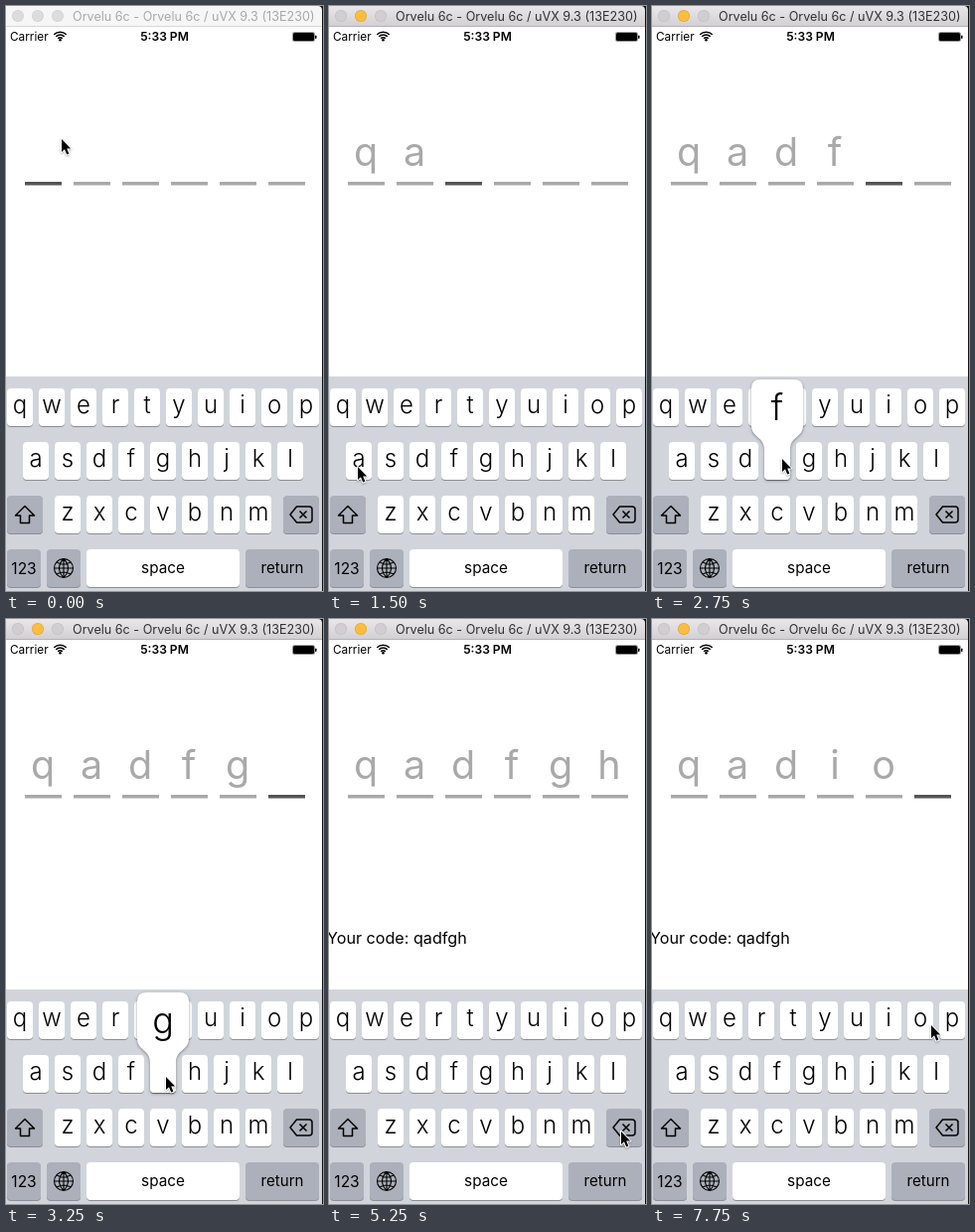
An HTML page with a canvas for the animation above (8 s loop, 319 px wide and 589 px high).

```html
<!DOCTYPE html>
<html lang="en">
<head>
<meta charset="utf-8">
<title>Code entry</title>
<style>
html, body { margin: 0; width: 100%; height: 100%; overflow: hidden; background: #fff; }
canvas { display: block; width: 319px; height: 589px; }
</style>
</head>
<body>
<canvas id="stage" width="319" height="589"></canvas>
<script>
const ctx = document.getElementById('stage').getContext('2d');
const LOOP = 8000;
const ROWS = [['qwertyuiop', 1, 385], ['asdfghjkl', 17, 439], ['zxcvbnm', 49, 493]];
const KEY_W = 26, KEY_H = 38, PITCH = 32;
const LIGHT = '#fff', DARK = '#abb0ba';

// start ms, pointer x, pointer y, typed code, pressed key
const STEPS = [
  [0, 56, 134, ''],
  [250, 46, 230, ''],
  [500, 25, 365, ''],
  [750, 17, 404, ''],
  [1000, 17, 405, 'q', 'q'],
  [1250, 21, 434, 'q'],
  [1500, 29, 464, 'qa'],
  [1750, 55, 465, 'qa'],
  [2000, 88, 463, 'qa'],
  [2250, 93, 462, 'qad', 'd'],
  [2500, 96, 461, 'qad'],
  [2750, 131, 456, 'qadf', 'f'],
  [3000, 146, 460, 'qadf'],
  [3250, 161, 461, 'qadfg', 'g'],
  [3500, 178, 459, 'qadfg'],
  [3750, 196, 455, 'qadfg'],
  [4000, 196, 455, 'qadfgh'],
  [4750, 228, 477, 'qadfgh'],
  [5000, 281, 510, 'qadfgh'],
  [5250, 294, 516, 'qadfgh'],
  [5500, 294, 516, 'qadfg'],
  [5750, 294, 516, 'qad', 'delete'],
  [6000, 274, 470, 'qad'],
  [6250, 248, 419, 'qad'],
  [6500, 242, 410, 'qad'],
  [6750, 242, 409, 'qadi', 'i'],
  [7000, 246, 409, 'qadi'],
  [7250, 270, 409, 'qadi'],
  [7500, 279, 409, 'qadio', 'o'],
  [7750, 281, 409, 'qadio']
];

function text(str, x, y, size, color = '#000', weight = 400, align = 'center') {
  ctx.font = `${weight} ${size}px Inter, sans-serif`;
  ctx.textAlign = align;
  ctx.fillStyle = color;
  ctx.fillText(str, x, y);
}

function rect(x, y, w, h, color) {
  ctx.fillStyle = color;
  ctx.fillRect(x, y, w, h);
}

function rounded(x, y, w, h, r, color) {
  ctx.beginPath();
  ctx.roundRect(x, y, w, h, r);
  ctx.fillStyle = color;
  ctx.fill();
}

function disc(x, y, r, color) {
  ctx.beginPath();
  ctx.arc(x, y, r, 0, Math.PI * 2);
  ctx.fillStyle = color;
  ctx.fill();
}

function strokePath(d, width = 1.5, color = '#000') {
  ctx.lineWidth = width;
  ctx.strokeStyle = color;
  ctx.lineJoin = 'round';
  ctx.stroke(new Path2D(d));
}

function key(x, y, w, color) {
  rounded(x, y + 1, w, KEY_H, 4, '#8b8e94');
  rounded(x, y, w, KEY_H, 4, color);
}

function titleBar(active) {
  rect(0, 0, 319, 21, '#000');
  const shade = ctx.createLinearGradient(0, 0, 0, 20);
  shade.addColorStop(0, active ? '#e9e7e9' : '#f6f6f6');
  shade.addColorStop(1, active ? '#d2d0d2' : '#f6f6f6');
  rounded(0, 0, 318, 20, [0, 4, 0, 0], shade);
  rect(0, 20, 318, 1, active ? '#b4b2b4' : '#d8d8d8');
  for (let i = 0; i < 3; i++) {
    const lit = active && i === 1;
    const rim = active ? '#bfbdbf' : '#d0d0d0';
    disc(12 + 20 * i, 10, 6, lit ? '#e0a030' : rim);
    disc(12 + 20 * i, 10, 5.4, lit ? '#fdbd3e' : active ? '#d0ced0' : '#dcdcdc');
  }
  text('Orvelu 6c - Orvelu 6c / uVX 9.3 (13E230)', 67, 15, 12.6,
    active ? '#303030' : '#a8a8a8', 400, 'left');
}

function statusBar() {
  text('Carrier', 4, 35, 11.8, '#000', 400, 'left');
  text('5:33 PM', 159.5, 35, 12.1, '#000', 600);
  for (const r of [3.2, 6, 8.8]) {
    ctx.beginPath();
    ctx.arc(54.5, 35, r, -Math.PI * 0.75, -Math.PI * 0.25);
    ctx.lineWidth = 1.6;
    ctx.strokeStyle = '#000';
    ctx.stroke();
  }
  disc(54.5, 34.3, 1.3, '#000');
  rounded(288, 26, 23, 10, 2.5, '#9a9a9a');
  rounded(289, 27, 21, 8, 1.5, '#000');
  rounded(311, 29.5, 1.5, 3.5, 1, '#000');
}

function codeField(code) {
  for (let i = 0; i < 6; i++) {
    rect(19 + 49 * i, 177, 37, 3.5, i === code.length ? '#555' : '#a9a9a9');
    if (code[i]) text(code[i], 37 + 49 * i, 161, 39.5, '#a9a9a9');
  }
}

function popup(letter, x, y) {
  const left = x - 13, right = x + KEY_W + 13, top = y - 63, end = y + KEY_H;
  const shape = new Path2D(`M${left + 9} ${top}H${right - 9}Q${right} ${top} ${right} ${top + 9}
    V${y - 17}C${right} ${y - 4} ${x + KEY_W} ${y - 6} ${x + KEY_W} ${y + 8}
    V${end - 4}q0 4 -4 4H${x + 4}q-4 0 -4 -4V${y + 8}
    C${x} ${y - 6} ${left} ${y - 4} ${left} ${y - 17}V${top + 9}Q${left} ${top} ${left + 9} ${top}Z`);
  ctx.save();
  ctx.shadowColor = 'rgba(0,0,0,.4)';
  ctx.shadowBlur = 3;
  ctx.shadowOffsetY = 1;
  ctx.fillStyle = '#fff';
  ctx.fill(shape);
  ctx.restore();
  text(letter, x + KEY_W / 2, y - 22, 36, '#000', 300);
}

function deleteIcon(pressed) {
  const body = 'M292.5 504H305q3 0 3 3V517q0 3 -3 3H292.5L286 512Z';
  if (pressed) {
    ctx.fillStyle = '#000';
    ctx.fill(new Path2D(body));
  }
  strokePath(body);
  strokePath('M295.5 508.5l7 7M302.5 508.5l-7 7', 1.5, pressed ? '#fff' : '#000');
}

function globeIcon() {
  strokePath(`M48.5 566a9.5 9.5 0 1 0 19 0a9.5 9.5 0 1 0 -19 0H67.5
    M58 556.5V575.5M58 556.5q-9 9.5 0 19q9 -9.5 0 -19
    M51 560q7 4 14 0M51 572q7 -4 14 0`, 1.1);
}

function keyboard(pressed) {
  rect(0, 373, 318, 216, '#d1d5db');
  let raised;
  for (const [letters, x0, y] of ROWS) {
    [...letters].forEach((letter, i) => {
      const x = x0 + PITCH * i;
      key(x, y, KEY_W, LIGHT);
      if (letter === pressed) raised = [letter, x, y];
      else text(letter, x + KEY_W / 2, y + 25, 24, '#000', 300);
    });
  }
  key(1, 493, 36, DARK);
  strokePath('M19 503.5L28.5 513H23.5V520.5H14.5V513H9.5Z');
  key(279, 493, 36, pressed === 'delete' ? LIGHT : DARK);
  deleteIcon(pressed === 'delete');
  key(1, 547, 34, DARK);
  key(41, 547, 34, DARK);
  key(81, 547, 154, LIGHT);
  key(241, 547, 74, DARK);
  text('123', 18, 572, 15.5);
  globeIcon();
  text('space', 158, 571, 15.3);
  text('return', 278, 571, 15.1);
  if (raised) popup(...raised);
}

function pointer(x, y) {
  ctx.save();
  ctx.translate(x, y);
  const arrow = new Path2D('M0 0V13L3 10.3L5.2 15.6L7.4 14.7L5.2 9.6H9.2Z');
  ctx.shadowColor = 'rgba(0,0,0,.3)';
  ctx.shadowBlur = 2;
  ctx.shadowOffsetY = 1;
  ctx.lineWidth = 2;
  ctx.strokeStyle = '#fff';
  ctx.stroke(arrow);
  ctx.shadowColor = 'transparent';
  ctx.fillStyle = '#000';
  ctx.fill(arrow);
  ctx.restore();
}

function draw(time) {
  const [, x, y, code, pressed] = STEPS.findLast(step => step[0] <= time);
  rect(0, 0, 319, 589, '#fff');
  titleBar(time >= 750);
  statusBar();
  codeField(code);
  if (time >= 4000) text('Your code: qadfgh', -2, 327, 16.15, '#000', 400, 'left');
  keyboard(pressed);
  rect(318, 0, 1, 589, '#111');
  pointer(x, y);
}

const start = performance.now();
function tick() {
  draw((performance.now() - start) % LOOP);
  requestAnimationFrame(tick);
}
tick();
</script>
</body>
</html>
```
